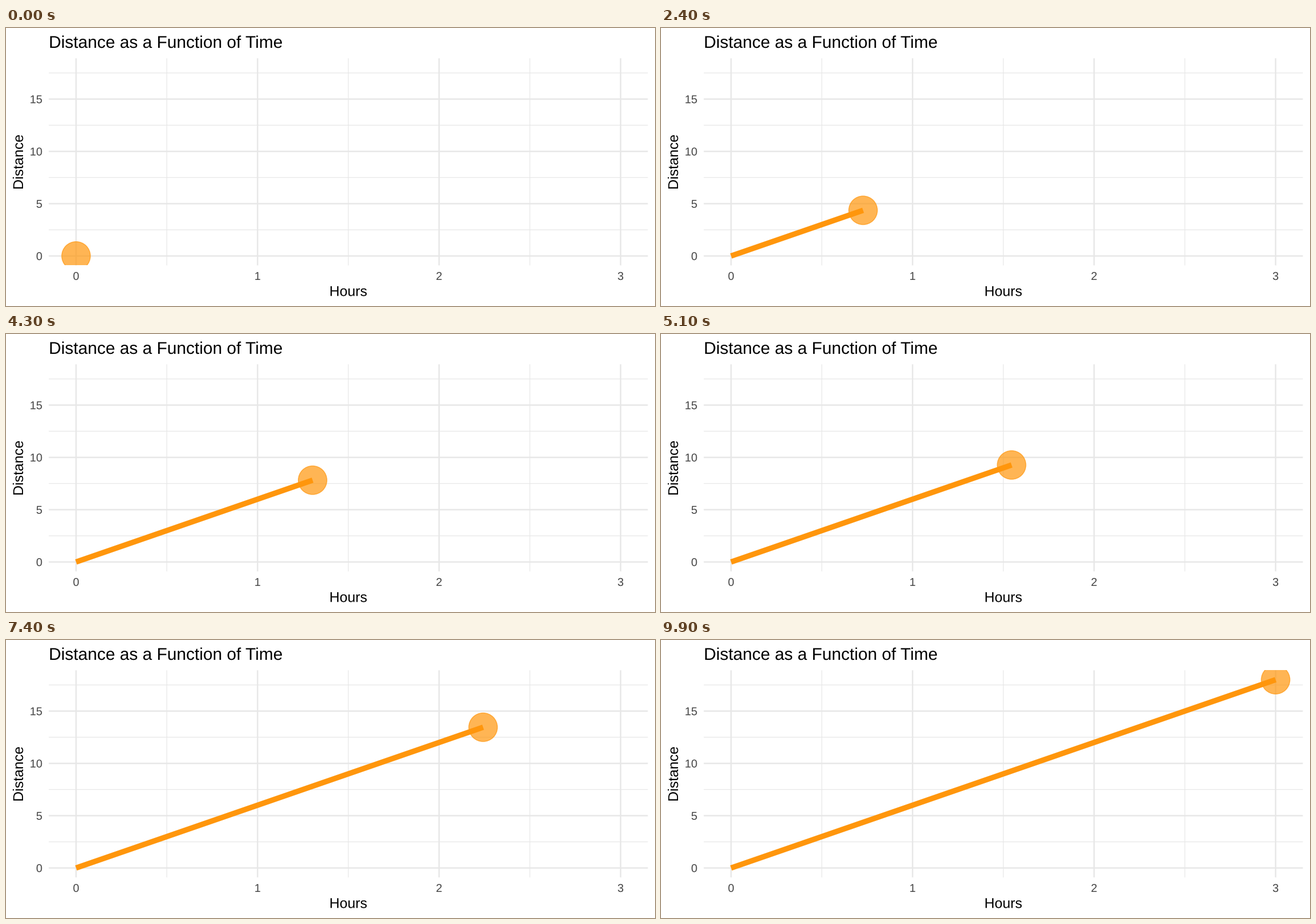
Recreate the animation shown at these times as a matplotlib script. Size 1143 by 490 pixels, loop 10 s.

```python
import matplotlib.pyplot as plt
from matplotlib.animation import FuncAnimation
from matplotlib.patches import Circle, PathPatch, Rectangle
from matplotlib.textpath import TextPath
from matplotlib.transforms import Affine2D

WIDTH, HEIGHT, DPI = 1143, 490, 128
FRAMES, INTERVAL = 100, 100
LEFT, RIGHT, TOP, BOTTOM = 75.4, 1130.4, 53.4, 418.4
MAX_HOURS, SPEED = 3, 6
ORANGE, GRID, TICK_GREY = "#FF960C", "#E7E7E7", "#444444"
DIGIT_ADVANCE = 0.556  # share of the font size


def px(size):
    """Convert pixels to points."""
    return size * 72 / DPI


def x_at(hours):
    return 123.4 + 319.67 * hours


def y_at(distance):
    return 401.8 - 18.433 * distance


fig = plt.figure(figsize=(WIDTH / DPI, HEIGHT / DPI), dpi=DPI, facecolor="white")
ax = fig.add_axes([0, 0, 1, 1])
ax.set_xlim(0, WIDTH)
ax.set_ylim(HEIGHT, 0)
ax.axis("off")


def draw_line(xs, ys, color, width, zorder):
    return ax.plot(xs, ys, color=color, lw=px(width), zorder=zorder,
                   solid_capstyle="butt", snap=False)[0]


def draw_text(text, x, y, size, color="black", angle=0):
    """Draw text whose baseline starts at (x, y)."""
    outline = TextPath((0, 0), text, size=size, prop={"family": "Liberation Sans"})
    place = Affine2D().scale(1, -1).rotate_deg(-angle).translate(x, y)
    ax.add_patch(PathPatch(place.transform_path(outline), fc=color, lw=0, snap=False))


def draw_grid(hours, distances, width, zorder):
    for h in hours:
        draw_line([x_at(h)] * 2, [TOP, BOTTOM], GRID, width, zorder)
    for d in distances:
        draw_line([LEFT, RIGHT], [y_at(d)] * 2, GRID, width, zorder)


hour_ticks, distance_ticks = range(4), range(0, 16, 5)
draw_grid([0.5, 1.5, 2.5], [2.5, 7.5, 12.5, 17.5], 1.21, 0)
draw_grid(hour_ticks, distance_ticks, 2.42, 1)

for h in hour_ticks:
    draw_text(str(h), x_at(h) - 10 * DIGIT_ADVANCE, 444, 20, TICK_GREY)
for d in distance_ticks:
    label = str(d)
    draw_text(label, 64.1 - 20 * DIGIT_ADVANCE * len(label), y_at(d) + 7.2, 20, TICK_GREY)

draw_text("Distance as a Function of Time", LEFT, 35, 30)
draw_text("Hours", 569.5, 472.3, 25)
draw_text("Distance", 30, 285, 25, angle=90)

panel = Rectangle((LEFT, TOP), RIGHT - LEFT, BOTTOM - TOP, transform=ax.transData)
trail = draw_line([], [], ORANGE, 9.6, 3)
ball = Circle((x_at(0), y_at(0)), 25.15, fc=ORANGE, ec=ORANGE, alpha=0.7,
              lw=px(1.48), zorder=4)
ax.add_patch(ball)
for artist in (trail, ball):
    artist.set_clip_path(panel)


def update(frame):
    hours = MAX_HOURS * frame / (FRAMES - 1)
    x, y = x_at(hours), y_at(SPEED * hours)
    trail.set_data([x_at(0), x], [y_at(0), y])
    ball.center = x, y
    return trail, ball


animation = FuncAnimation(fig, update, frames=FRAMES, interval=INTERVAL,
                          init_func=lambda: update(0), repeat=True, repeat_delay=0)
plt.show()
```
